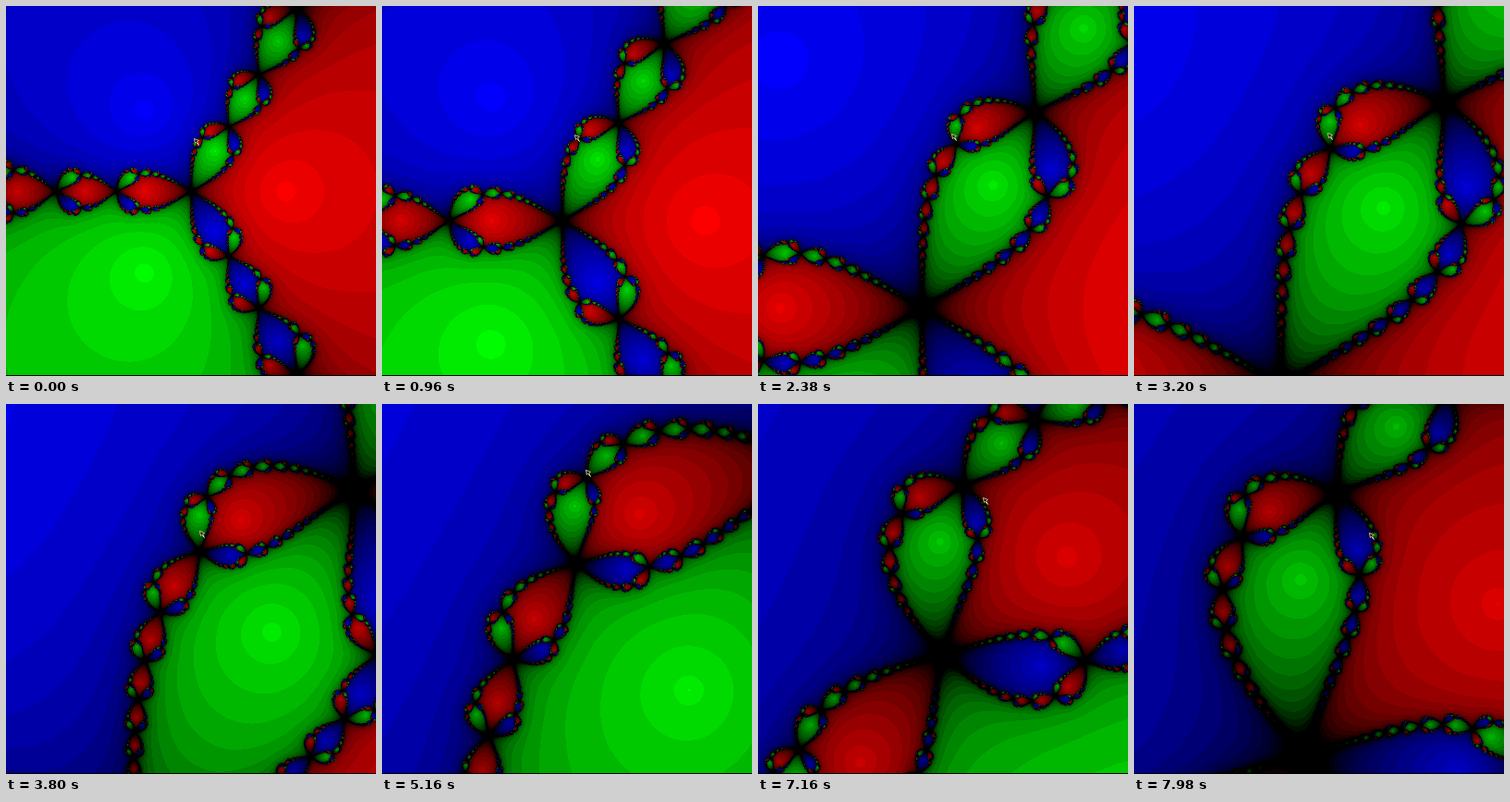
Animation of 400x400 px, one loop 8 s. Source, as an HTML page with a canvas:

```html
<!DOCTYPE html>
<html lang="en">
<head>
<meta charset="utf-8">
<title>Newton zoom</title>
<style>
  html, body { margin: 0; width: 100%; height: 100%; overflow: hidden; background: #000; }
  canvas { display: block; width: 400px; height: 400px; }
</style>
</head>
<body>
<canvas width="400" height="400"></canvas>
<script>
const SIZE = 400, HALF = SIZE / 2, LOOP = 8000, MAX_ITER = 16;
const ctx = document.querySelector('canvas').getContext('2d');
const image = ctx.createImageData(SIZE, SIZE);
const pixels = new Uint32Array(image.data.buffer);

// Junctions of the basins of z^3 = 1 that stay in sight during the zoom.
const origin = [0, 0], inner = [0.1216, 0.5779], upper = [0.1332, 0.6757];

// step, pixels per unit, junction, its place on screen, pointer place
const keys = [
  [0, 101.3, origin, 200, 200, 206, 147],
  [32, 197, origin, 190, 258, 214, 140],
  [51, 307, origin, 177, 326, 212, 142],
  [82, 600, inner, 210, 159, 212, 141],
  [110, 945, inner, 210, 172, 223, 75],
  [154, 1853, inner, 200, 270, 246, 105],
  [171, 2880, upper, 219, 97, 257, 143]
].map(([step, scale, [re, im], x, y, px, py]) => ({
  step, scale, px, py,
  re: re - (x - HALF) / scale,
  im: im + (y - HALF) / scale
}));

const mix = (a, b, k) => a + (b - a) * k;

// Steps last 20, 100 and 20 ms in turn.
function stepAt(time) {
  const rest = time % 140;
  return 3 * Math.floor(time / 140) + (rest < 20 ? 0 : rest < 120 ? 1 : 2);
}

// The centre is linear in 1/scale, so each leg zooms about a fixed screen point.
function viewAt(step) {
  let i = 0;
  while (i < keys.length - 2 && step >= keys[i + 1].step) i++;
  const a = keys[i], b = keys[i + 1];
  const k = (step - a.step) / (b.step - a.step);
  const scale = a.scale * (b.scale / a.scale) ** k;
  const c = (1 / scale - 1 / a.scale) / (1 / b.scale - 1 / a.scale);
  return {
    scale, re: mix(a.re, b.re, c), im: mix(a.im, b.im, c),
    px: Math.round(mix(a.px, b.px, k)), py: Math.round(mix(a.py, b.py, k))
  };
}

// Each basin fades evenly to black with the number of iterations.
const BLACK = 0xff000000;
const ramp = shift => Array.from({ length: MAX_ITER + 1 }, (_, n) => {
  const level = Math.max(0, Math.min(255, 269 - 17 * n));
  return (BLACK | level << shift) >>> 0;
});
const reds = ramp(0), greens = ramp(8), blues = ramp(16);

function colorAt(re, im) {
  for (let n = 0; n <= MAX_ITER; n++) {
    const a = re * re - im * im, b = 2 * re * im;
    const u = a * re - b * im - 1, v = a * im + b * re;
    if (u * u + v * v < 1e-3) return (re > 0 ? reds : im > 0 ? blues : greens)[n];
    const d = 3 * (a * a + b * b);
    re = re * 2 / 3 + a / d;
    im = im * 2 / 3 - b / d;
  }
  return BLACK;
}

function drawPointer(x, y) {
  ctx.beginPath();
  ctx.moveTo(x - 2.5, y - 3.5);
  ctx.lineTo(x + 2.5, y - 1.5);
  ctx.lineTo(x + 0.5, y - 0.5);
  ctx.lineTo(x + 2.5, y + 3.5);
  ctx.lineTo(x - 0.5, y + 0.5);
  ctx.lineTo(x - 1.5, y + 1.5);
  ctx.closePath();
  ctx.fillStyle = '#000';
  ctx.fill();
  ctx.lineWidth = 1;
  ctx.strokeStyle = '#c8c88c';
  ctx.stroke();
}

function draw(step) {
  const { scale, re, im, px, py } = viewAt(step);
  // The bottom row stays black.
  pixels.fill(BLACK);
  for (let y = 0, i = 0; y < SIZE - 1; y++) {
    const zi = im - (y - HALF) / scale;
    for (let x = 0; x < SIZE; x++) pixels[i++] = colorAt(re + (x - HALF) / scale, zi);
  }
  ctx.putImageData(image, 0, 0);
  drawPointer(px, py);
}

let shown = -1;
function tick() {
  const step = stepAt(performance.now() % LOOP);
  if (step !== shown) draw(shown = step);
  requestAnimationFrame(tick);
}
tick();
</script>
</body>
</html>
```
